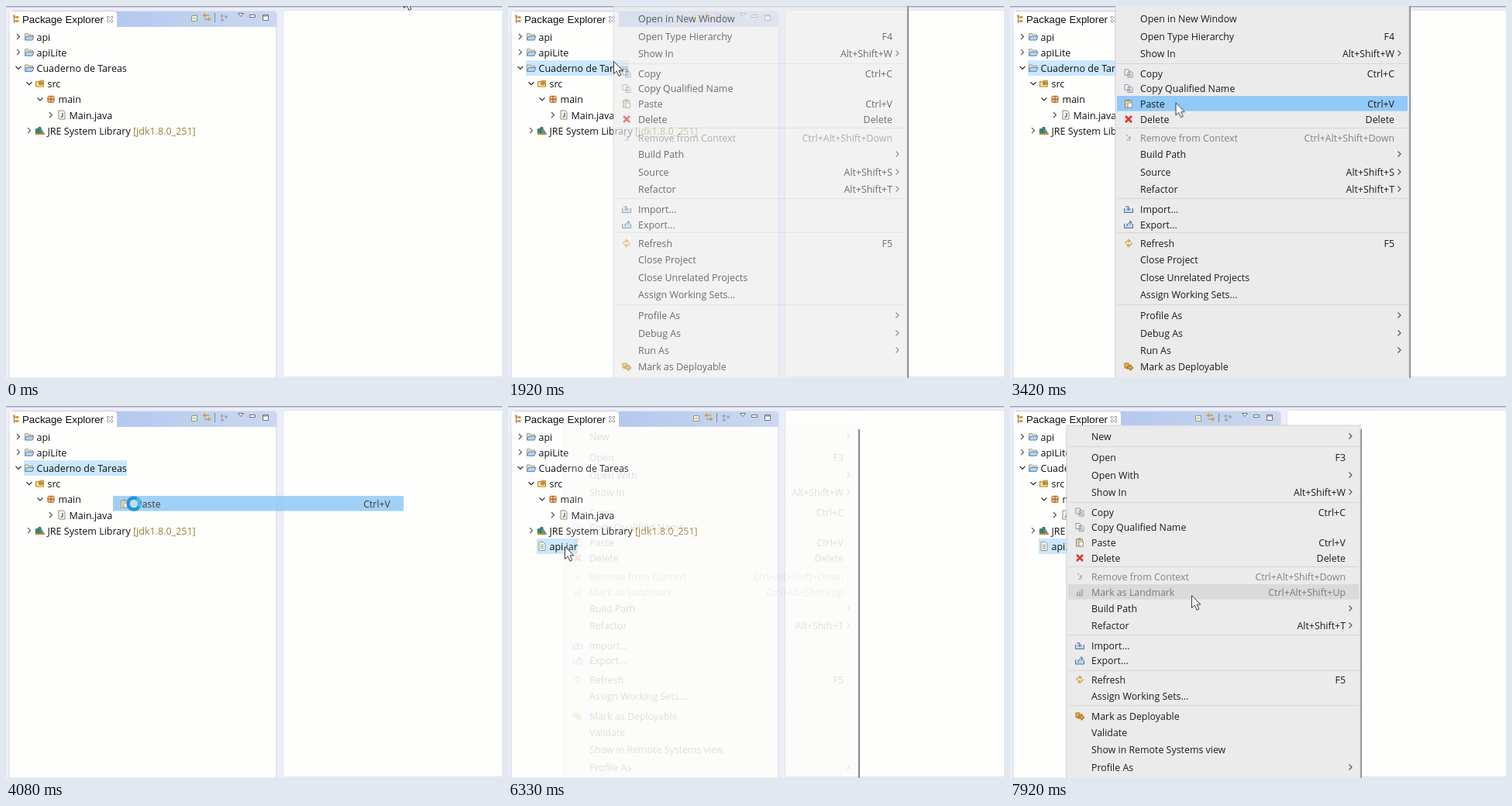
Recreate the animation shown at these times as an HTML page. Size 640 px wide and 480 px high, loop 8000 ms.

```html
<!DOCTYPE html>
<html lang="es">
<head>
<meta charset="utf-8">
<title>Package Explorer</title>
<style>
html, body { margin: 0; width: 100%; height: 100%; overflow: hidden; background: #eceef9; }
svg { display: block; width: 640px; height: 480px; }
text { font: 12.4px "Open Sans", "Noto Sans", sans-serif; fill: #1c1c1c; white-space: pre; }
#tree text { font-size: 12.5px; fill: #111; }
#tab { font: 13.3px "Liberation Sans", Arial, sans-serif; fill: #111; }
.off { opacity: .5; }
.line { fill: none; stroke: #555; stroke-width: 1.2; }

/* 96 steps of 1/12 s; the small negative delay absorbs rounding */
.a { animation: 8s step-end -4ms infinite; }
#project { animation-name: project; }
#library { animation-name: library; }
#jar { animation-name: jar; }
#jarRow { animation-name: jarRow; }
#flash { animation-name: flash; }
#menu1 { animation-name: menu1; }
#menu2 { animation-name: menu2; }
#shade1 { animation-name: shade1; }
#shade2 { animation-name: shade2; }
#bar1 { animation-name: bar1; }
#bar2 { animation-name: bar2; }
#cursor { animation-name: cursor; }
#arrow { animation-name: arrow; }
#busy { animation-name: busy; }
#spin { animation: spin 1s steps(12) -4ms infinite; }

@keyframes project { 0% { opacity: 0 } 12.5% { opacity: .6 } 21.875% { opacity: 1 } 68.75%, 100% { opacity: 0 } }
@keyframes library { 0% { opacity: 0 } 59.375% { opacity: .6 } 62.5%, 100% { opacity: 0 } }
@keyframes jar { 0% { opacity: 0 } 62.5% { opacity: .6 } 68.75%, 100% { opacity: 1 } }
@keyframes jarRow { 0% { opacity: 0 } 56.25%, 100% { opacity: 1 } }
@keyframes flash {
  0% { opacity: 0 }
  51.042% { opacity: .85; animation-timing-function: steps(4) }
  55.208%, 100% { opacity: 0 }
}
@keyframes menu1 {
  0% { opacity: 0 }
  21.875% { opacity: .14; animation-timing-function: steps(3) }
  25% { opacity: .9 }
  26.042% { opacity: 1 }
  51.042%, 100% { opacity: 0 }
}
@keyframes menu2 {
  0% { opacity: 0 }
  79.167% { opacity: .14; animation-timing-function: steps(3) }
  82.292% { opacity: .9 }
  83.333%, 100% { opacity: 1 }
}
@keyframes shade1 { 0% { opacity: 0 } 21.875% { opacity: 1 } 51.042%, 100% { opacity: 0 } }
@keyframes shade2 { 0% { opacity: 0 } 79.167%, 100% { opacity: 1 } }
@keyframes bar1 {
  0% { opacity: 0; transform: translateY(87px) }
  34.375% { opacity: 1; transform: translateY(87px) }
  37.5% { opacity: 1; transform: translateY(106.5px) }
  39.583%, 100% { opacity: 1; transform: translateY(126px) }
}
@keyframes bar2 {
  0% { opacity: 0; transform: translateY(137px) }
  87.5% { opacity: 1; transform: translateY(137px); fill: #91c9f7 }
  88.542% { opacity: 1; transform: translateY(89px) }
  89.583% { opacity: 1; transform: translateY(137px) }
  90.625% { opacity: 1; transform: translateY(176px) }
  91.667% { opacity: 1; transform: translateY(283px) }
  92.708% { opacity: 1; transform: translateY(353px) }
  93.75% { opacity: 1; transform: translateY(443.5px) }
  94.792% { opacity: 1; transform: translateY(374px) }
  95.833% { opacity: 1; transform: translateY(309px); fill: #91c9f7 }
  96.875% { opacity: 1; transform: translateY(220px); fill: #dadada }
  97.917%, 100% { opacity: 1; transform: translateY(240px); fill: #dadada }
}
@keyframes cursor {
  0% { transform: translate(513px, -14px); animation-timing-function: steps(3) }
  3.125% { transform: translate(329px, 8px) }
  8.333% { transform: translate(329px, 8px); animation-timing-function: steps(4) }
  12.5% { transform: translate(138px, 71px) }
  14.583% { transform: translate(137px, 72px) }
  15.625% { transform: translate(136px, 71px) }
  31.25% { transform: translate(136px, 72px); animation-timing-function: steps(4) }
  35.417% { transform: translate(157px, 90px); animation-timing-function: steps(6) }
  41.667% { transform: translate(262px, 123px); animation-timing-function: steps(2) }
  43.75% { transform: translate(165px, 126px) }
  54.167% { transform: translate(165px, 126px); animation-timing-function: steps(6) }
  60.417% { transform: translate(105px, 158px); animation-timing-function: steps(3) }
  63.542% { transform: translate(73px, 181px) }
  86.458% { transform: translate(73px, 181px); animation-timing-function: steps(2) }
  88.542% { transform: translate(88px, 74px); animation-timing-function: steps(2) }
  90.625% { transform: translate(112px, 192px); animation-timing-function: steps(3) }
  93.75% { transform: translate(165px, 446px); animation-timing-function: steps(3) }
  96.875% { transform: translate(222px, 225px); animation-timing-function: steps(2) }
  98.958%, 100% { transform: translate(234px, 244px) }
}
@keyframes arrow { 0% { opacity: 1 } 51.042% { opacity: 0 } 54.167%, 100% { opacity: 1 } }
@keyframes busy { 0% { opacity: 0 } 51.042% { opacity: 1 } 54.167%, 100% { opacity: 0 } }
@keyframes spin { to { transform: rotate(360deg) } }
</style>
</head>
<body>
<svg viewBox="0 0 640 480">
  <defs>
    <linearGradient id="strip">
      <stop stop-color="#b4c9ee"/><stop offset="1" stop-color="#cbd8f0"/>
    </linearGradient>
    <g id="folder">
      <path d="M-5.5 4V-4h4l1 1.5h5V4z" fill="#f3e3a2" stroke="#8fa0b0"/>
      <path d="M-5.5 4.5l2-5h9.5l-2 5z" fill="#b5d5f2" stroke="#5585b5"/>
    </g>
    <g id="src">
      <path d="M-5.5 4V-2.5h4l1-1.5h5V4z" fill="#f8dc84" stroke="#b8862c"/>
      <path d="M-1-2h4v3h-4z" fill="#e2a24a" stroke="#9a5a24"/>
    </g>
    <g id="pkg">
      <rect x="-4" y="-4" width="8" height="8" rx="1" fill="#f0c08a" stroke="#b2622c"/>
      <path d="M0-4.500V4.500M-4.500 0H4.500" stroke="#9e5428"/>
    </g>
    <g id="java">
      <path d="M-4-5.500h6l2 2v9h-8z" fill="#fffdf0" stroke="#8b8a60"/>
      <path d="M1-2.500V1.500q0 1.500-2.500 1" fill="none" stroke="#38668c" stroke-width="1.400"/>
    </g>
    <g id="lib">
      <path d="M-5.500 4v-6h3v6zM-2 4v-8h3v8z" fill="#3d9a72" stroke="#2c6650"/>
      <path d="M1.500-3l4 7h-4z" fill="#4c86b4"/>
      <path d="M-6 4.500H6" stroke="#d48a28" stroke-width="2"/>
    </g>
    <g id="jar-icon">
      <path d="M-4-5.500h5.500l2.500 2.500v8.500h-8z" fill="#f6f8ee" stroke="#8d9a8a"/>
      <path d="M-2-1.500h4M-2 .5h4M-2 2.500h4" stroke="#86a58a"/>
    </g>
    <g id="copy" fill="#f2f4f8" stroke="#8e949c">
      <path d="M-5-5h5l1 1v6h-6zM-1-2h5l1 1v6h-6zM.5 1h3M.5 3h3"/>
    </g>
    <g id="paste">
      <rect x="-4.500" y="-4" width="8" height="9" fill="#e6d3a0" stroke="#a08c5c"/>
      <path d="M-2.500-5.500h4v2h-4z" fill="#8b8b88"/>
      <path d="M-1-1h5.500v6H-1z" fill="#fbfbfa" stroke="#909498"/>
    </g>
    <path id="del" d="M-4-4L4 4M4-4L-4 4" stroke="#dc3a2c" stroke-width="2.600"/>
    <path id="ctx" d="M-3-4l2 2M0-1l2 2v-3M-2 3h4" fill="none" stroke="#777" stroke-width="1.500"/>
    <path id="landmark" d="M-3 4V0M0 4v-5M3 4v-8M-4 4.500h8" stroke="#777" stroke-width="1.600"/>
    <g id="imp">
      <path d="M-5.500-1v5.500h11V-1" fill="#c4d6ea" stroke="#4f7592"/>
      <path d="M-4-3h4v4M-2-.5L0 1.500L2-.5" fill="none" stroke="#2f5f88"/>
    </g>
    <g id="exp">
      <path d="M-5.500-1v5.500h11V-1" fill="#c4d6ea" stroke="#4f7592"/>
      <path d="M-2 2q0-4 5-5M1-5l3 2-2 3" fill="none" stroke="#2f5f88"/>
    </g>
    <g id="refresh" fill="none" stroke="#d2a345" stroke-width="1.500">
      <path d="M-4 1q0-4 5-4M-1-5l3 2-2 2M4-1q0 4-5 4M1 5l-3-2 2-2"/>
    </g>
    <g id="deploy">
      <path d="M-5-4h5v6h-5z" fill="#efb84a" stroke="#a86d18"/>
      <path d="M-2 0h4v-2.500L6 2 2 5.500V3h-4z" fill="#e8a830" stroke="#985c12"/>
    </g>
  </defs>

  <rect width="640" height="480" fill="#eceef9"/>
  <rect width="640" height="1.500" fill="#a2a6b6"/>
  <rect x="357.500" y="5.500" width="290" height="473" rx="4" fill="#fefefc" stroke="#e0e3f0"/>
  <path d="M4 480V11q0-4 4-4H345q4 0 4 4V480z" fill="#fefefc" stroke="#d2d6e4"/>
  <path d="M143 7H345q4 0 4 4V27H143z" fill="url(#strip)"/>
  <path d="M4.500 28V10q0-4 4-4H139q4 0 4 4V28z" fill="#fefefc"/>
  <path d="M143.500 27V11q0-4-4-4.500H8" fill="none" stroke="#c4cbdc"/>

  <g id="tools">
    <path d="M10.500 12v10M11 14.500h3M11 19.500h3" stroke="#8a6a3a" fill="none"/>
    <path d="M9 11.500h3v3H9zM13 13h3.500v3H13zM13 18h3.500v3H13z" fill="#d59a45"/>
    <text id="tab" x="21" y="22">Package Explorer</text>
    <path d="M130.500 13.500l2 0 1.500 2 1.500-2h2v2l-2 1.500 2 1.500v2h-2l-1.500-2-1.500 2h-2v-2l2-1.500-2-1.500z" fill="#fefefc" stroke="#808088" stroke-width=".8"/>
    <path d="M239.500 12.500h7v7h-7zM241 16h4" fill="#f5f3d8" stroke="#8a9a80"/>
    <path d="M262 12h-7l2-2m-2 2l2 2M256 17h7l-2-2m2 2l-2 2" fill="none" stroke="#cf9a40" stroke-width="1.600"/>
    <path d="M269.500 9v12" stroke="#7f8898"/>
    <g fill="#a4a8b0"><circle cx="278.500" cy="13" r="2"/><circle cx="284" cy="14" r="2"/><circle cx="279" cy="18" r="2"/></g>
    <path d="M299.500 9.500h7l-3.500 4zM314.500 11.500h7v3h-7zM331.500 11.500h7v7h-7zM331 13h8" fill="#fefefe" stroke="#6c6e74"/>
  </g>

  <g id="tree">
    <rect id="project" class="a" x="23" y="70" width="133" height="20" fill="#cce8ff"/>
    <rect id="library" class="a" x="37" y="151" width="209" height="20" fill="#cce8ff"/>
    <rect id="jar" class="a" x="37" y="171" width="53" height="20" fill="#cce8ff"/>
  </g>
  <g id="flash" class="a">
    <rect x="138" y="116" width="375" height="19.500" fill="#91c9f7"/>
    <use href="#paste" x="153" y="126"/>
    <text x="168" y="130.500">Paste</text>
    <text x="496" y="130.500" text-anchor="end">Ctrl+V</text>
  </g>
  <g id="menus"></g>
  <g id="cursor" class="a">
    <path id="arrow" class="a" d="M.5.5V16.500L4.200 13 7 19.300 9.800 18 7 12H12z" fill="#fefefe" stroke="#3a3a3a"/>
    <g id="busy" class="a">
      <circle r="7.500" fill="#bfe0f6" stroke="#2496d4" stroke-width="4.500"/>
      <path id="spin" d="M0-7.500A7.500 7.500 0 0 1 7.500 0" fill="none" stroke="#5cbcec" stroke-width="3"/>
    </g>
  </g>
</svg>
<script>
const byId = id => document.getElementById(id);
const chevron = (x, y) => `<path class="line" d="M${x - 2} ${y - 3.5}l3.500 3.500-3.500 3.500"/>`;
const opened = (x, y) => `<path class="line" style="stroke:#222" d="M${x - 3.5} ${y - 2}l3.500 3.500 3.500-3.500"/>`;

// depth, icon, label, toggle, extra label
const rows = [
  [0, 'folder', 'api', chevron],
  [0, 'folder', 'apiLite', chevron],
  [0, 'folder', 'Cuaderno de Tareas', opened],
  [1, 'src', 'src', opened],
  [2, 'pkg', 'main', opened],
  [3, 'java', 'Main.java', chevron],
  [1, 'lib', 'JRE System Library', chevron, ' [jdk1.8.0_251]'],
  [1, 'jar-icon', 'api.jar']
];
byId('tree').insertAdjacentHTML('beforeend', rows.map(([depth, icon, label, toggle, extra], i) => {
  const x = 14 * depth, y = 40 + 20.2 * i;
  return `<g${toggle ? '' : ' id="jarRow" class="a"'}>
    ${toggle ? toggle(x + 16, y - .5) : ''}
    <use href="#${icon}" x="${x + 30}" y="${y - .5}"/>
    <text x="${x + 39.5}" y="${y + 4.5}">${label}${extra ? `<tspan fill="#9a8238">${extra}</tspan>` : ''}</text></g>`;
}).join(''));

// y, label, shortcut, icon; ">" marks a submenu, "-" a disabled entry
const first = [
  [16, 'Open in New Window'], [39, 'Open Type Hierarchy', 'F4'], [61, 'Show In>', 'Alt+Shift+W'],
  [87, 'Copy', 'Ctrl+C', 'copy'], [106.5, 'Copy Qualified Name', '', 'copy'],
  [126, 'Paste', 'Ctrl+V', 'paste'], [146, 'Delete', 'Delete', 'del'],
  [170, '-Remove from Context', 'Ctrl+Alt+Shift+Down', 'ctx'], [191, 'Build Path>'],
  [214, 'Source>', 'Alt+Shift+S'], [236, 'Refactor>', 'Alt+Shift+T'],
  [262, 'Import...', '', 'imp'], [282, 'Export...', '', 'exp'],
  [306, 'Refresh', 'F5', 'refresh'], [327, 'Close Project'], [350, 'Close Unrelated Projects'],
  [372, 'Assign Working Sets...'], [399, 'Profile As>'], [422, 'Debug As>'], [444, 'Run As>'],
  [465, 'Mark as Deployable', '', 'deploy']
];
const second = [
  [39, 'New>'], [66, 'Open', 'F3'], [89, 'Open With>'], [111, 'Show In>', 'Alt+Shift+W'],
  [137, 'Copy', 'Ctrl+C', 'copy'], [156.5, 'Copy Qualified Name', '', 'copy'],
  [176, 'Paste', 'Ctrl+V', 'paste'], [196, 'Delete', 'Delete', 'del'],
  [220, '-Remove from Context', 'Ctrl+Alt+Shift+Down', 'ctx'],
  [240, '-Mark as Landmark', 'Ctrl+Alt+Shift+Up', 'landmark'],
  [261, 'Build Path>'], [283, 'Refactor>', 'Alt+Shift+T'],
  [309, 'Import...', '', 'imp'], [328.5, 'Export...', '', 'exp'],
  [353, 'Refresh', 'F5', 'refresh'], [374, 'Assign Working Sets...'],
  [400, 'Mark as Deployable', '', 'deploy'], [421, 'Validate'],
  [443.5, 'Show in Remote Systems view'], [466, 'Profile As>']
];

function entry([y, label, keys = '', icon]) {
  return `<g${label[0] === '-' ? ' class="off"' : ''}>
    ${icon ? `<use href="#${icon}" x="17" y="${y}"/>` : ''}
    <text x="32" y="${y + 4.5}">${label.replace(/^-|>$/g, '')}</text>
    <text x="360" y="${y + 4.5}" text-anchor="end">${keys}</text>
    ${label.endsWith('>') ? chevron(366.5, y) : ''}</g>`;
}

function menu(n, x, top, items, rules) {
  return `<g transform="translate(${x})">
    <path id="shade${n}" class="a" d="M380 ${top + 5}V480" stroke="#868686" stroke-width="2"/>
    <g id="menu${n}" class="a">
      <rect x="0" y="${top}" width="379" height="520" fill="#ebebec" stroke="#cdcdce"/>
      ${rules.map(y => `<path d="M2 ${y + .5}H377" stroke="#d6d6d2"/>`).join('')}
      <rect id="bar${n}" class="a" x="2" y="-10" width="375" height="19.500" fill="#91c9f7"/>
      ${items.map(entry).join('')}
    </g></g>`;
}

byId('menus').innerHTML =
  menu(1, 136, -10, first, [74, 157, 248, 292, 385]) +
  menu(2, 73, 25, second, [52, 124, 207, 295, 341, 386]);
</script>
</body>
</html>
```
